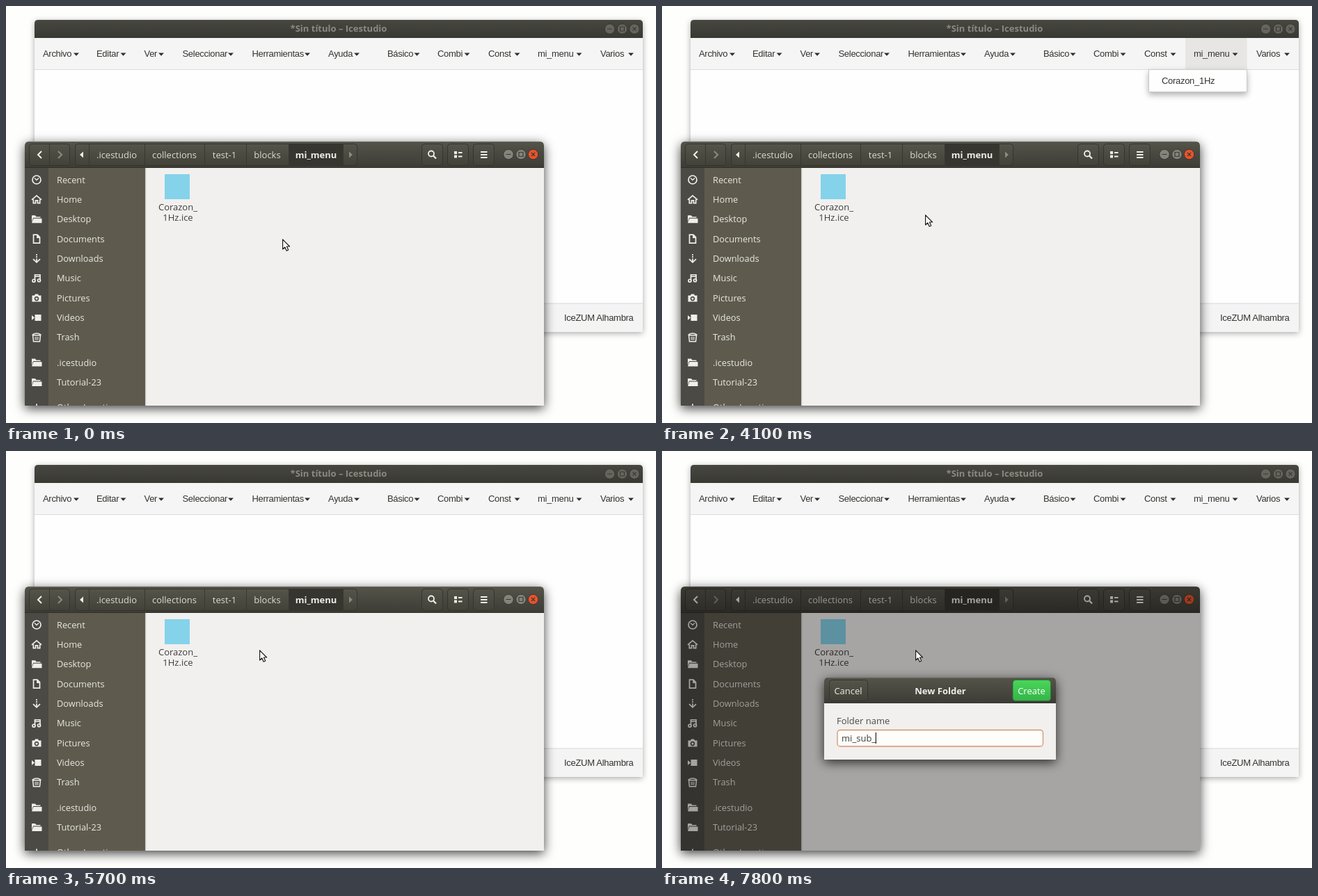
Write an HTML page that moves like this. It is 934 px wide and 600 px high and loops after 8000 ms.

```html
<!DOCTYPE html>
<html lang="es">
<head>
<meta charset="utf-8">
<title>Menú de bloques</title>
<style>
html, body { margin: 0; width: 100%; height: 100%; overflow: hidden; background: #fefefd; }
svg { display: block; width: 100vw; height: 100vh; }
text { font: 13px "Open Sans", "Noto Sans", sans-serif; white-space: pre; }
.app text { font: 13px "Liberation Sans", Arial, sans-serif; letter-spacing: -.3px; fill: #33342f; }
.b, .app .b { font: 700 13px "Open Sans", "Noto Sans", sans-serif; letter-spacing: 0; }
.side text { font-size: 12.8px; fill: #e9e8e2; }
.mid { text-anchor: middle; }
.end { text-anchor: end; }
.ic { fill: none; stroke: #f0efea; stroke-width: 1.7; }
.ic .f { fill: #f0efea; stroke: none; }
</style>
</head>
<body>
<svg id="stage" viewBox="0 0 934 600" preserveAspectRatio="none">
<defs>
  <linearGradient id="head" x2="0" y2="1"><stop stop-color="#55544a"/><stop offset="1" stop-color="#3c3b35"/></linearGradient>
  <linearGradient id="title" x2="0" y2="1"><stop stop-color="#474740"/><stop offset="1" stop-color="#393934"/></linearGradient>
  <linearGradient id="btn" x2="0" y2="1"><stop stop-color="#55544b"/><stop offset="1" stop-color="#434239"/></linearGradient>
  <linearGradient id="green" x2="0" y2="1"><stop stop-color="#4ad65a"/><stop offset="1" stop-color="#34b548"/></linearGradient>
  <linearGradient id="hot" x2="0" y2="1"><stop stop-color="#f2804f"/><stop offset="1" stop-color="#ea6a3a"/></linearGradient>
  <filter id="soft" x="-10%" y="-10%" width="120%" height="125%"><feDropShadow dx="0" dy="2" stdDeviation="4.5" flood-opacity=".33"/></filter>
  <filter id="deep" x="-15%" y="-25%" width="130%" height="160%"><feDropShadow dx="0" dy="4" stdDeviation="8" flood-opacity=".75"/></filter>
  <filter id="pop" x="-10%" y="-30%" width="120%" height="180%"><feDropShadow dx="0" dy="4" stdDeviation="4" flood-opacity=".3"/></filter>
  <clipPath id="frame"><path d="M27 233V201Q27 195 33 195H767Q773 195 773 201V575H27Z"/></clipPath>
</defs>
</svg>
<script>
const stage = document.getElementById('stage');

const rect = (x, y, w, h, fill, more = '') =>
  `<rect x="${x}" y="${y}" width="${w}" height="${h}" fill="${fill}" ${more}/>`;
const label = (x, y, s, fill = '', cls = '') =>
  `<text x="${x}" y="${y}" class="${cls}" ${fill && `fill="${fill}"`}>${s}</text>`;
const path = (d, fill, more = '') => `<path d="${d}" fill="${fill}" ${more}/>`;
const line = (d, stroke, w = 1) => path(d, 'none', `stroke="${stroke}" stroke-width="${w}"`);
const group = (id, body, more = '') => `<g id="${id}" ${more}>${body}</g>`;

function controls(x, y, fill, mark, closeFill) {
  const dot = (cx, f) => `<circle cx="${cx}" cy="${y}" r="7.2" fill="${f}" stroke="#33322d" stroke-width=".8"/>`;
  return dot(x, fill) + dot(x + 18, fill) + dot(x + 35.5, closeFill) +
    line(`M${x - 3.5} ${y}h7M${x + 15} ${y - 3}h6v6h-6zM${x + 33} ${y - 2.5}l5 5m0-5l-5 5`, mark, 1.2);
}

// Editor window behind
function editor() {
  const menus = [['Archivo', 53, 101], ['Editar', 130, 168.5], ['Ver', 198.5, 223], ['Seleccionar', 253.5, 323],
    ['Herramientas', 353.5, 433], ['Ayuda', 463, 504], ['Básico', 548, 590.5], ['Combi', 620, 662.5],
    ['Const', 693, 734.5], ['mi_menu', 764, 823.5], ['Varios', 854, 898]];
  return path('M41 46V25Q41 20 46 20H910Q915 20 915 25V469H41Z', '#fefefe', 'filter="url(#soft)"') +
    path('M41 46V25Q41 20 46 20H910Q915 20 915 25V46Z', 'url(#title)') +
    label(478, 37, '*Sin título – Icestudio', '#8b8a82', 'b mid').replace('<text', '<text style="fill:#8b8a82"') +
    controls(867.5, 33, '#66655d', '#3a3933', '#66655d') +
    rect(41, 46, 874, 45, '#f4f5f4') + rect(41, 91, 874, 1, '#dcdddc') +
    rect(41, 428, 874, 41, '#f3f4f3') + rect(41, 427.5, 874, 1, '#d9dad9') +
    rect(752, 46, 88.5, 45, '#e7e6e5', 'id="hover"') +
    menus.map(([s, x, c]) => label(x, 73, s) + path(`M${c - 4} 67.5h8l-4 4.2z`, '#2d2d2a')).join('') +
    label(802, 453, 'IceZUM Alhambra') +
    group('drop', rect(699.5, 91.5, 141, 32, '#fefefe', 'stroke="#cbcbca" filter="url(#pop)"') +
      rect(700, 97, 140, 20.5, '#f4f4f3', 'id="row"') + label(718, 111.5, 'Corazon_1Hz'));
}

const folder = '<path class="f" d="M-7-5.5h5l1.5 2H5.500V-2H-5L-7 4zM-4.500-1H7.500V5.500H-7z"/>';
const icons = {
  Recent: '<circle r="6"/><path d="M-3-2.500L0 .5 3-2.500" stroke-width="1.300"/>',
  Home: '<path d="M-7 .5L0-5.500 7 .5M-4.700 0V5.300H-1.500V1.500H1.500V5.300H4.700V0"/>',
  Desktop: folder,
  Documents: '<path d="M-4.500-6H1L4.500-2.500V6H-4.500zM1-6V-2H4.500"/>',
  Downloads: '<path d="M0-6.500V5.500" stroke-dasharray="2 1.200 2 1.200 9"/><path d="M-5 .8L0 5.500 5 .8"/>',
  Music: '<path d="M-2.500 3.500V-5H5V3M-2.500-2.500H5"/><circle cx="-4" cy="3.500" r="2"/><circle cx="3.500" cy="3" r="2"/>',
  Pictures: '<path class="f" d="M-6.500-3.500H-3L-2-5.500H2L3-3.500H6.500V5.500H-6.500z"/><circle cy="1" r="2.500" stroke="#4b4a45"/>',
  Videos: '<path class="f" d="M-2.500-4.500H6.500V4.500H-2.500zM-7-3.500L-3 0-7 3.500z"/>',
  Trash: '<path d="M-5.500-3H5.500L4.500 6H-4.500zM-6.500-3.500Q0-8 6.500-3.500" stroke-width="1.500"/><path d="M-2-1V4M0-1V4M2-1V4" stroke-width="1"/>'
};

function sidebar() {
  const item = (s, y, icon) => label(73, y + 4.5, s) + `<g class="ic" transform="translate(44 ${y})">${icon}</g>`;
  return rect(27, 233, 34, 342, '#4b4a45') + rect(61, 233, 139.500, 342, '#5e5b4e') +
    Object.keys(icons).map((s, i) => item(s, 250 + i * 28.35, icons[s])).join('') +
    item('.icestudio', 513, folder) + item('Tutorial-23', 541.5, folder) +
    item('Other Locations', 577.5, '<path d="M-5 0H5M0-5V5"/>');
}

function header() {
  const frame = (x, w) => rect(x + .5, 198.5, w, 31, 'url(#btn)', 'rx="4" stroke="#34332e"');
  const crumbs = [['.icestudio', 159], ['collections', 242], ['test-1', 314], ['blocks', 375.5]];
  return rect(27, 195, 746, 38, 'url(#head)') + line('M32 195.500H768', '#68675c') +
    frame(33, 58) + frame(99, 405) + frame(597, 30) + frame(634, 30) + frame(671, 30) +
    rect(406, 199, 78.5, 30, '#36352f') +
    line('M62.500 199V229M119.500 199V229M199.500 199V229M285.500 199V229M345.500 199V229M406.500 199V229M484.500 199V229', '#39382f') +
    line('M51 209L46 214 51 219', '#f0efea', 2) + line('M75 209L80 214 75 219', '#8c8a80', 2) +
    path('M111 209.500V218.500L106 214z', '#f0efea') + path('M493 209.500V218.500L498 214z', '#8c8a80') +
    crumbs.map(([s, x]) => label(x, 218.500, s, '#dddcd4', 'mid')).join('') +
    label(445.500, 218.500, 'mi_menu', '#f0efea', 'b mid') +
    '<circle cx="611" cy="212.500" r="4" fill="none" stroke="#f0efea" stroke-width="1.800"/>' +
    line('M614 215.500L618 219.500', '#f0efea', 2.300) +
    path('M644 209h4v4h-4zm0 5.500h4v4h-4zm6-4.500h5.500v2H650zm0 5.500h5.500v2H650z', '#f0efea') +
    line('M682 210H691.500M682 214H691.500M682 218H691.500', '#f0efea', 2) +
    controls(722, 213.500, '#85837a', '#3a3933', '#e8532b') + rect(27, 232, 746, 1, '#302f2a');
}

// Logo stands as one plain square
function files() {
  return path('M27 233V201Q27 195 33 195H767Q773 195 773 201V575H27Z', '#f1f0ee', 'filter="url(#deep)"') +
    `<g clip-path="url(#frame)">` + rect(27, 195, 746, 380, '#f1f0ee') +
    `<g class="side">${sidebar()}</g>` + rect(200, 233, 1.5, 342, '#d0cfca') + header() +
    rect(228, 242, 36, 36, '#84d3ea') +
    label(247, 294, 'Corazon_', '#3d3d3a', 'mid') + label(247, 309, '1Hz.ice', '#3d3d3a', 'mid') +
    rect(27, 195, 746, 380, '#000', 'id="dim"') + '</g>';
}

function context() {
  const rows = [['New Folder', 286, 'Shift+Ctrl+N'], ['Paste', 309.500, 'Ctrl+V'], ['Select All', 332, 'Ctrl+A'],
    ['Properties', 355.500, 'Ctrl+I'], ['Open in Terminal', 378, ''], ['Restore Missing Files…', 399, '']];
  return rect(353, 271, 249, 133, '#3d3c37', 'rx="1" filter="url(#pop)"') +
    line('M354 293.500H601M354 316.500H601M354 339.500H601M354 362.500H601', '#45443e') +
    rect(353, 271, 249, 22, 'url(#hot)', 'id="pick"') +
    rows.map(([s, y, k]) => label(369.500, y, s, s === 'Paste' ? '#83817a' : '#e6e5df') +
      label(594.500, y, k, '#8a8880', 'end')).join('');
}

function dialog() {
  const top = 'M233 363V331Q233 326 238 326H561Q566 326 566 331V';
  return path(top + '444H233Z', '#f1f0ee', 'filter="url(#deep)"') + path(top + '363H233Z', 'url(#head)') +
    line('M238 326.500H561', '#68675c') + rect(233, 362, 333, 1, '#34332e') +
    rect(240.500, 329.500, 55, 30, 'url(#btn)', 'rx="4" stroke="#34332e"') +
    label(267.500, 349.500, 'Cancel', '#eeede8', 'mid') + label(400, 349.500, 'New Folder', '#eeede8', 'b mid') +
    rect(503.500, 329.500, 55, 30, 'none', 'rx="4" stroke="#3f3e37"') +
    group('create', rect(504, 329.500, 54.500, 30, 'url(#green)', 'rx="4" stroke="#2c7a38"') +
      label(531, 349.500, 'Create', '#fff', 'mid')) +
    label(251, 392.500, 'Folder name', '#4b4a46') +
    rect(252, 401.500, 295.500, 23.500, '#fdfdfc', 'rx="4" stroke="#d2966f" stroke-width="1.300"') +
    '<text id="name" x="258" y="418" fill="#3d3d3a"></text>' + rect(0, 405, 1.200, 16, '#222', 'id="caret"');
}

const outline = 'stroke="#1c1c1a" stroke-width="1.200" stroke-linejoin="round"';
const arrow = path('M.6 .8V15L3.800 12 6.200 17.200 8.700 16 6.400 11H10.600Z', '#fff', outline);
const hand = path('M3.500 9.500V2Q3.500 .7 4.800 .7T6.200 2V6Q8.500 5 9 6.500 11 5.700 11.500 7.200 14.300 6.700 14.300 9V12L13 16.300H5.500L.8 10.500Q.8 8.500 3.500 9.500Z', '#fff', outline) +
  line('M6.200 6V9M9 6.500V9M11.500 7.200V9.500', '#1c1c1a', .9);

stage.insertAdjacentHTML('beforeend', `<g class="app">${editor()}</g>` + files() +
  group('context', context()) + group('dialog', dialog()) +
  group('pointer', group('arrow', arrow) + group('hand', hand)));

const el = id => document.getElementById(id);
const show = (id, on) => el(id).setAttribute('visibility', on ? 'inherit' : 'hidden');
const during = (t, a, b = Infinity) => t >= a && t < b;
const latest = (list, t, first) => list.reduce((v, [at, next]) => t >= at ? next : v, first);

// Pointer moves: start, steps of 100 ms, end point
const moves = [[700, 2, 423, 228], [1000, 6, 790, 69], [2100, 2, 797, 98], [2400, 1, 810, 107],
  [3200, 2, 787, 131], [3500, 4, 392, 317], [4000, 5, 351, 269], [4900, 2, 360, 277], [5700, 1, 364, 286]];
const shade = [[5800, .06], [5900, .17], [6000, .26], [6100, .3], [6300, .315]];
const typed = [[6600, 'm'], [6700, 'mi'], [7000, 'mi_'], [7300, 'mi_s'], [7400, 'mi_su'], [7800, 'mi_sub_']];

function pointerAt(t) {
  let x = 397, y = 335;
  for (const [start, steps, tx, ty] of moves) {
    if (t < start) break;
    const p = Math.min(1, (Math.floor((t - start) / 100) + 1) / steps);
    const e = p * p * (3 - 2 * p);
    x += (tx - x) * e;
    y += (ty - y) * e;
  }
  return [x, y];
}

function draw(t) {
  const overLink = during(t, 1400, 3300);
  el('pointer').setAttribute('transform', `translate(${pointerAt(t).map(Math.round)})`);
  show('arrow', !overLink);
  show('hand', overLink);
  show('hover', during(t, 1400, 4200));
  show('drop', during(t, 1600, 4200));
  show('row', during(t, 2200, 3300));
  show('context', during(t, 4700, 5500));
  show('pick', during(t, 4900, 5500));
  show('dialog', during(t, 5800));
  show('create', during(t, 6600));
  el('create').setAttribute('opacity', t < 6700 ? .6 : 1);
  el('dim').setAttribute('opacity', latest(shade, t, 0));
  const text = latest(typed, t, '');
  el('name').textContent = text;
  el('caret').setAttribute('x', 257.600 + (text ? el('name').getComputedTextLength() : 0));
}

const begin = performance.now();
function tick() {
  draw((performance.now() - begin) % 8000);
  requestAnimationFrame(tick);
}
tick();
</script>
</body>
</html>
```
